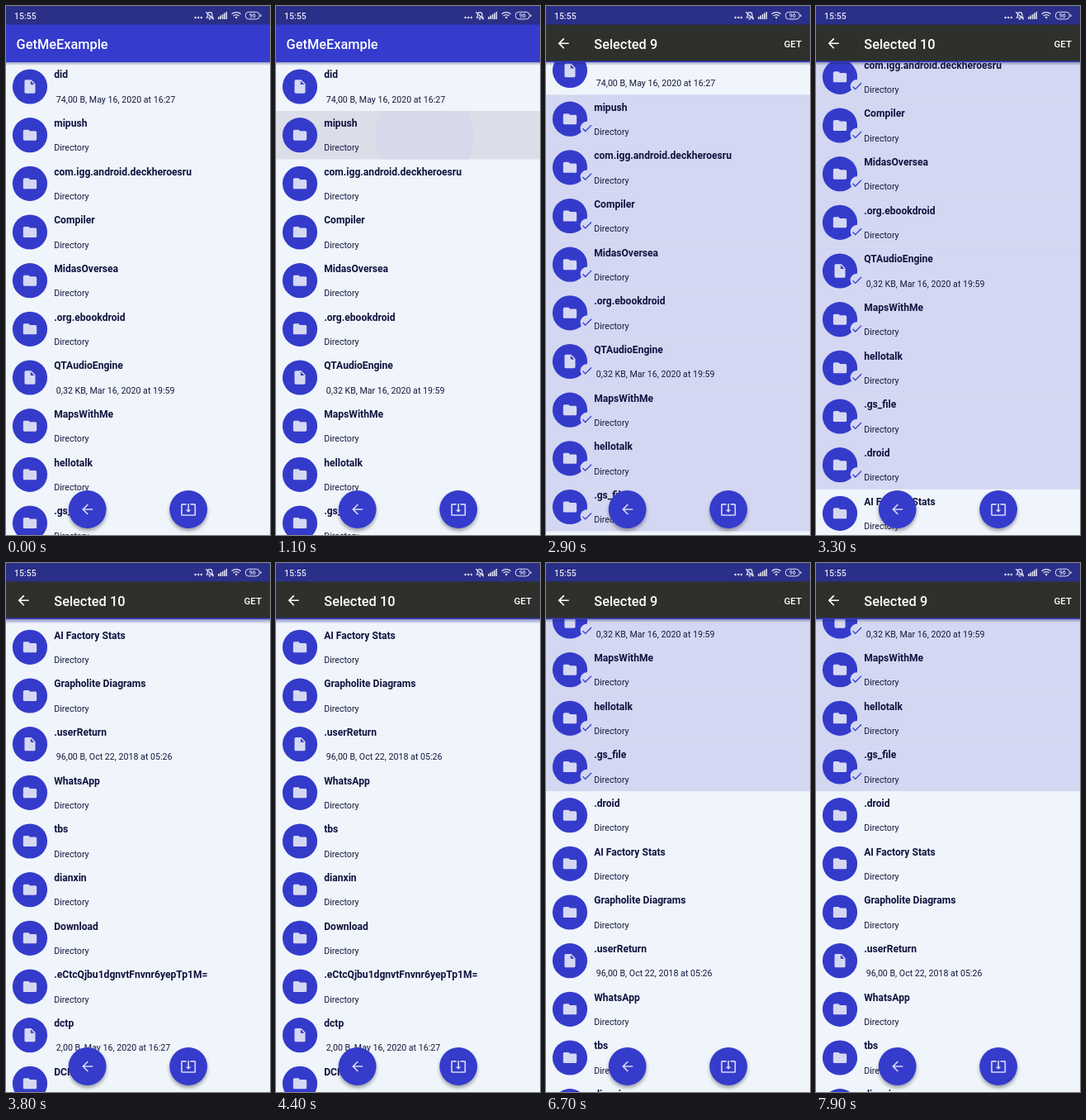
These frames come from a looping animation (320 by 640 pixels, 8 s). An HTML page:

```html
<!DOCTYPE html>
<html lang="en">
<head>
<meta charset="utf-8">
<title>File picker</title>
<style>
  html, body { margin: 0; width: 100%; height: 100%; overflow: hidden; background: #eff5fa; }
  svg { display: block; width: 320px; height: 640px; font-family: Roboto, Arial, sans-serif; }
  text { white-space: pre; }
  .name { font-size: 12.1px; font-weight: 700; fill: #11123f; }
  .info { font-size: 10.65px; fill: #17183f; }
  .bar { font-size: 16.33px; font-weight: 500; fill: #fff; }
  .get { font-size: 11.43px; font-weight: 500; fill: #fff; }
  .clock { font-size: 10.5px; font-weight: 500; fill: #e4e5f4; }
  .level { font-size: 7px; font-weight: 500; fill: #e4e5f4; }
</style>
</head>
<body>
<svg id="stage" viewBox="0 0 320 640">
  <defs>
    <clipPath id="view"><rect y="68" width="320" height="572"/></clipPath>
    <clipPath id="rowClip"><rect width="320" height="58.67"/></clipPath>
    <linearGradient id="shade" x2="0" y2="1">
      <stop stop-color="#20245c" stop-opacity=".38"/>
      <stop offset="1" stop-color="#20245c" stop-opacity="0"/>
    </linearGradient>
    <filter id="drop" x="-30%" y="-30%" width="160%" height="170%">
      <feDropShadow dx="0" dy="3" stdDeviation="2.2" flood-color="#000" flood-opacity=".34"/>
    </filter>
  </defs>
  <rect width="320" height="640" fill="#eff5fa"/>
  <g clip-path="url(#view)"><g id="list"></g></g>
  <rect y="68" width="320" height="4" fill="url(#shade)"/>

  <rect y="22" width="320" height="46" fill="#343bcd"/>
  <text class="bar" x="12.6" y="52">GetMeExample</text>
  <g id="action">
    <rect y="22" width="320" height="44.6" fill="#2d302b"/>
    <text class="bar" id="count" x="58.3" y="52"></text>
    <text class="get" x="288.6" y="50">GET</text>
  </g>

  <rect width="320" height="22.5" fill="#2a2f88"/>
  <text class="clock" x="10" y="15.5">15:55</text>
  <g fill="#e4e5f4">
    <circle cx="229.6" cy="14" r="1.2"/><circle cx="233.2" cy="14" r="1.2"/><circle cx="236.8" cy="14" r="1.2"/>
    <path d="M257 13h1.6v3H257zM259.4 11.5h1.6v4.5h-1.6zM261.8 10h1.6v6h-1.6zM264.2 8.5h1.6V16h-1.6zM266.6 7h1.4v9h-1.4z"/>
    <path d="M277.6 13.4a2.2 2.2 0 0 1 3 0L279.1 15.8z"/>
  </g>
  <g fill="none" stroke="#e4e5f4" stroke-width="1.2">
    <path d="M243.4 14h7.4c-1-1-1-2-1-3.600a2.700 2.700 0 0 0-5.400 0c0 1.600 0 2.600-1 3.600zM245.800 15.800h2.400M242.200 7.200l9.600 9"/>
    <path d="M273.600 9.800a8 8 0 0 1 11 0M275.600 12a5 5 0 0 1 7 0"/>
    <rect x="290.300" y="7.300" width="17" height="8.600" rx="4" stroke-width="1"/>
    <path d="M308.900 10.200v2.800"/>
  </g>
  <text class="level" x="298.800" y="14.100" text-anchor="middle">96</text>
  <g id="fabs"></g>
</svg>
<script>
const NS = "http://www.w3.org/2000/svg";
const LOOP = 8000, PITCH = 58.667, TOP = 68.3;
const BLUE = "#343bcb", PALE = "#d5d8f3", PICKED = "#d3d7f1";

const ICON = {
  folder: "M10 4H4c-1.1 0-1.99.9-1.99 2L2 18c0 1.1.9 2 2 2h16c1.1 0 2-.9 2-2V8c0-1.1-.9-2-2-2h-8l-2-2z",
  file: "M6 2c-1.1 0-1.99.9-1.99 2L4 20c0 1.1.89 2 1.99 2H18c1.1 0 2-.9 2-2V8l-6-6H6zm7 7V3.5L18.5 9H13z",
  back: "M20 11H7.83l5.59-5.59L12 4l-8 8 8 8 1.41-1.41L7.83 13H20v-2z",
  check: "M9 16.17L4.83 12l-1.42 1.41L9 19 21 7l-1.41-1.41z",
  save: "M12 16.5l4-4h-3v-9h-2v9H8l4 4zm9-13h-6v1.99h6v14.03H3V5.49h6V3.5H3c-1.1 0-2 .9-2 2v14c0 1.1.9 2 2 2h18c1.1 0 2-.9 2-2v-14c0-1.1-.9-2-2-2z"
};

// [name, file details]; folders have no details
const ITEMS = [
  ["did", " 74,00 B, May 16, 2020 at 16:27"],
  ["mipush"], ["com.igg.android.deckheroesru"], ["Compiler"], ["MidasOversea"], [".org.ebookdroid"],
  ["QTAudioEngine", " 0,32 KB, Mar 16, 2020 at 19:59"],
  ["MapsWithMe"], ["hellotalk"], [".gs_file"], [".droid"], ["AI Factory Stats"], ["Grapholite Diagrams"],
  [".userReturn", " 96,00 B, Oct 22, 2018 at 05:26"],
  ["WhatsApp"], ["tbs"], ["dianxin"], ["Download"], [".eCtcQjbu1dgnvtFnvnr6yepTp1M="],
  ["dctp", " 2,00 B, May 16, 2020 at 16:27"],
  ["DCIM"]
];

// Time at which rows 1, 2, 3 ... become selected
const PICKS = [1400, 1500, 1600, 1800, 1900, 2000, 2300, 2500, 2700, 3100];
const DROP = { row: 10, time: 6600 };
const SCROLL = [[0, 0], [2700, 0], [2900, 19.5], [3200, 48], [3400, 210], [3600, 520],
                [3800, 641], [4400, 641], [4600, 560], [4800, 440], [5000, 390], [5200, 379]];

function add(parent, tag, attrs, text) {
  const el = document.createElementNS(NS, tag);
  for (const key in attrs) el.setAttribute(key, attrs[key]);
  if (text !== undefined) el.textContent = text;
  return parent.appendChild(el);
}

function addIcon(parent, name, x, y, size, fill) {
  const k = size / 24;
  return add(parent, "path", {
    d: ICON[name], fill, transform: `translate(${x - size / 2} ${y - size / 2}) scale(${k})`
  });
}

const byId = id => document.getElementById(id);
const list = byId("list"), action = byId("action"), count = byId("count");

const rows = ITEMS.map(([name, info], i) => {
  const g = add(list, "g", { transform: `translate(0 ${TOP + i * PITCH})` });
  const back = add(g, "rect", { width: 320, height: PITCH + 0.1, fill: PICKED });
  const press = add(g, "g", { "clip-path": "url(#rowClip)" });
  add(press, "rect", { width: 320, height: PITCH, fill: "#dbdee9" });
  const ripple = add(press, "circle", { cx: 180, cy: 30, r: 0, fill: "#d7d9ea" });
  add(g, "circle", { cx: 29, cy: 29.2, r: 21.1, fill: BLUE });
  addIcon(g, info ? "file" : "folder", 29, 29.2, 19.6, PALE);
  const badge = add(g, "g", {});
  add(badge, "circle", { r: 8, fill: PICKED });
  addIcon(badge, "check", 0, 0, 15.6, BLUE);
  add(g, "text", { class: "name", x: 58.2, y: 19.2 }, name);
  add(g, "text", { class: "info", x: 58.2, y: 48.4 }, info || "Directory");
  return { back, press, ripple, badge };
});

addIcon(action, "back", 21.2, 45.3, 19.6, "#fff");
for (const [x, icon] of [[98.7, "back"], [221.1, "save"]]) {
  add(byId("fabs"), "circle", { cx: x, cy: 609, r: 22.9, fill: BLUE, filter: "url(#drop)" });
  addIcon(byId("fabs"), icon, x, 609, 19.6, PALE);
}

const clamp = v => Math.max(0, Math.min(1, v));

function along(steps, t) {
  const i = steps.findIndex(s => s[0] > t);
  if (i < 0) return steps[steps.length - 1][1];
  const [t0, a] = steps[i - 1], [t1, b] = steps[i];
  return a + (b - a) * (t - t0) / (t1 - t0);
}

function render(t) {
  list.setAttribute("transform", `translate(0 ${-along(SCROLL, t)})`);
  let total = 0;
  rows.forEach((row, i) => {
    const start = PICKS[i - 1];
    const on = t >= start && !(i === DROP.row && t >= DROP.time);
    if (on) total++;
    row.back.style.display = row.badge.style.display = on ? "" : "none";
    if (on) {
      const grow = clamp((t - start + 100) / 200);
      row.badge.setAttribute("transform", `translate(49.6 40.4) scale(${grow})`);
    }
    const held = i === 1 && t >= 900 && t < PICKS[0];
    row.press.style.display = held ? "" : "none";
    if (held) row.ripple.setAttribute("r", (t - 900) * 0.3);
  });
  action.style.opacity = clamp((t - 1300) / 200);
  count.textContent = "Selected " + total;
}

const origin = performance.now();
function tick() {
  const t = (performance.now() - origin) % LOOP;
  render(Math.floor(t / 100) * 100);
  requestAnimationFrame(tick);
}
tick();
</script>
</body>
</html>
```
